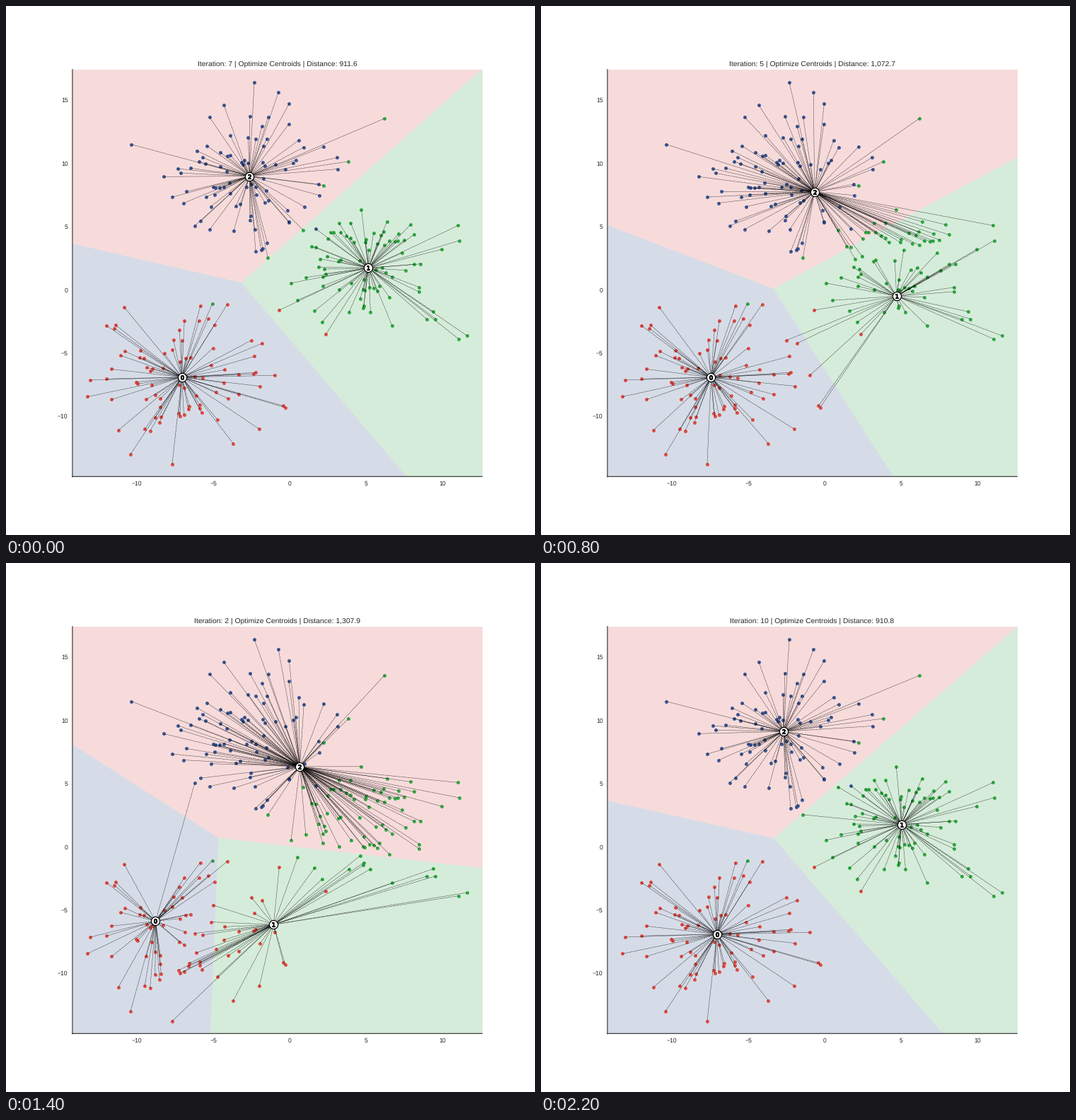
A matplotlib script that plays this animation: 748 px wide and 748 px high, repeating every 2.4 s.

```python
import numpy as np
import matplotlib.pyplot as plt
from matplotlib.animation import FuncAnimation
from matplotlib.collections import LineCollection

DPI = 68
PX = 72 / DPI                      # points per pixel
INK = "#262626"
ORDER = [7, 7, 6, 4, 5, 1, 0, 2, 3, 8, 9, 10]
BLOB_COLORS = ["#1f4287", "#16a02c", "#e0352b"]
REGION_COLORS = np.array([[214, 220, 232], [214, 237, 218], [247, 219, 219]]) / 255

plt.rcParams.update({"font.family": "Liberation Sans", "text.hinting": "none"})


def make_blobs(sizes=(84, 83, 83), spread=3.0, seed=42):
    rng = np.random.RandomState(seed)
    centers = rng.uniform(-10, 10, (3, 2))
    return [rng.normal(c, spread, (n, 2)) for c, n in zip(centers, sizes)]


def nearest(xy, centroids):
    gaps = xy[..., None, :] - centroids
    return (gaps ** 2).sum(axis=-1).argmin(axis=-1)


def k_means(xy, centroids, steps):
    """Return (centroids, labels, total distance) for every step."""
    history = []
    for _ in range(steps):
        labels = nearest(xy, centroids)
        centroids = np.array([xy[labels == k].mean(axis=0) for k in range(3)])
        total = np.linalg.norm(xy - centroids[labels], axis=1).sum()
        history.append((centroids, labels, total))
    return history


blobs = make_blobs()
points = np.vstack(blobs)
start = np.array([[-3.726, 2.802], [3.881, -4.791], [2.189, 6.890]])
history = k_means(points, start, 11)

(x0, y0), (x1, y1) = points.min(axis=0) - 1, points.max(axis=0) + 1
nx, ny = 1160, 1152
grid = np.stack(np.meshgrid(x0 + (np.arange(nx) + 0.5) * (x1 - x0) / nx,
                            y0 + (np.arange(ny) + 0.5) * (y1 - y0) / ny), axis=-1)

fig = plt.figure(figsize=(11, 11), dpi=DPI, facecolor="white")
ax = fig.add_axes([0.125, 0.11, 0.775, 0.77])
regions = ax.imshow(np.ones((ny, nx, 3)), extent=(x0, x1, y0, y1),
                    origin="lower", aspect="auto", zorder=0)


def dots(xy, size, **style):
    return ax.scatter(*np.transpose(xy), s=(size * PX) ** 2, **style)


for blob, color in zip(blobs, BLOB_COLORS):
    dots(blob, 5, color=color, linewidths=0, alpha=0.85, zorder=1)

links = LineCollection([], colors="black", linewidths=0.47 * PX,
                       linestyles="--", zorder=2)
ax.add_collection(links)

badges = []
for k, spot in enumerate(start):
    disc = dots([spot], 12.2, c="white", edgecolors="black",
                linewidths=1.2 * PX, zorder=3 + k)
    digit = dots([spot], 6.1, marker=f"${k}$", c="black", edgecolors="black",
                 linewidths=1.2 * PX, zorder=3.5 + k)
    badges.append((disc, digit))

# The axis lines sit just inside the plot area.
INSET = 0.43
for side, spine in ax.spines.items():
    spine.set_visible(side in ("left", "bottom"))
    spine.set(color=INK, linewidth=1.08 * PX, snap=False)
    spine.set_position(("outward", -INSET * PX))

ax.set(xlim=(x0, x1), ylim=(y0, y1),
       xticks=range(-10, 11, 5), yticks=range(-10, 16, 5))
ax.tick_params(length=0, pad=(6.06 + INSET) * PX, labelsize=8.66 * PX, labelcolor=INK)
title = ax.set_title("", fontsize=10.4 * PX, pad=5.2 * PX, color=INK)


def update(frame):
    step = ORDER[frame]
    centroids, labels, total = history[step]
    regions.set_data(REGION_COLORS[nearest(grid, centroids)])
    links.set_segments(np.stack([points, centroids[labels]], axis=1))
    for spot, badge in zip(centroids, badges):
        for mark in badge:
            mark.set_offsets([spot])
    title.set_text(f"Iteration: {step} | Optimize Centroids | Distance: {total:,.1f}")
    return [regions, links, title]


anim = FuncAnimation(fig, update, frames=len(ORDER), interval=200,
                     init_func=lambda: update(0), repeat=True)
plt.show()
```
